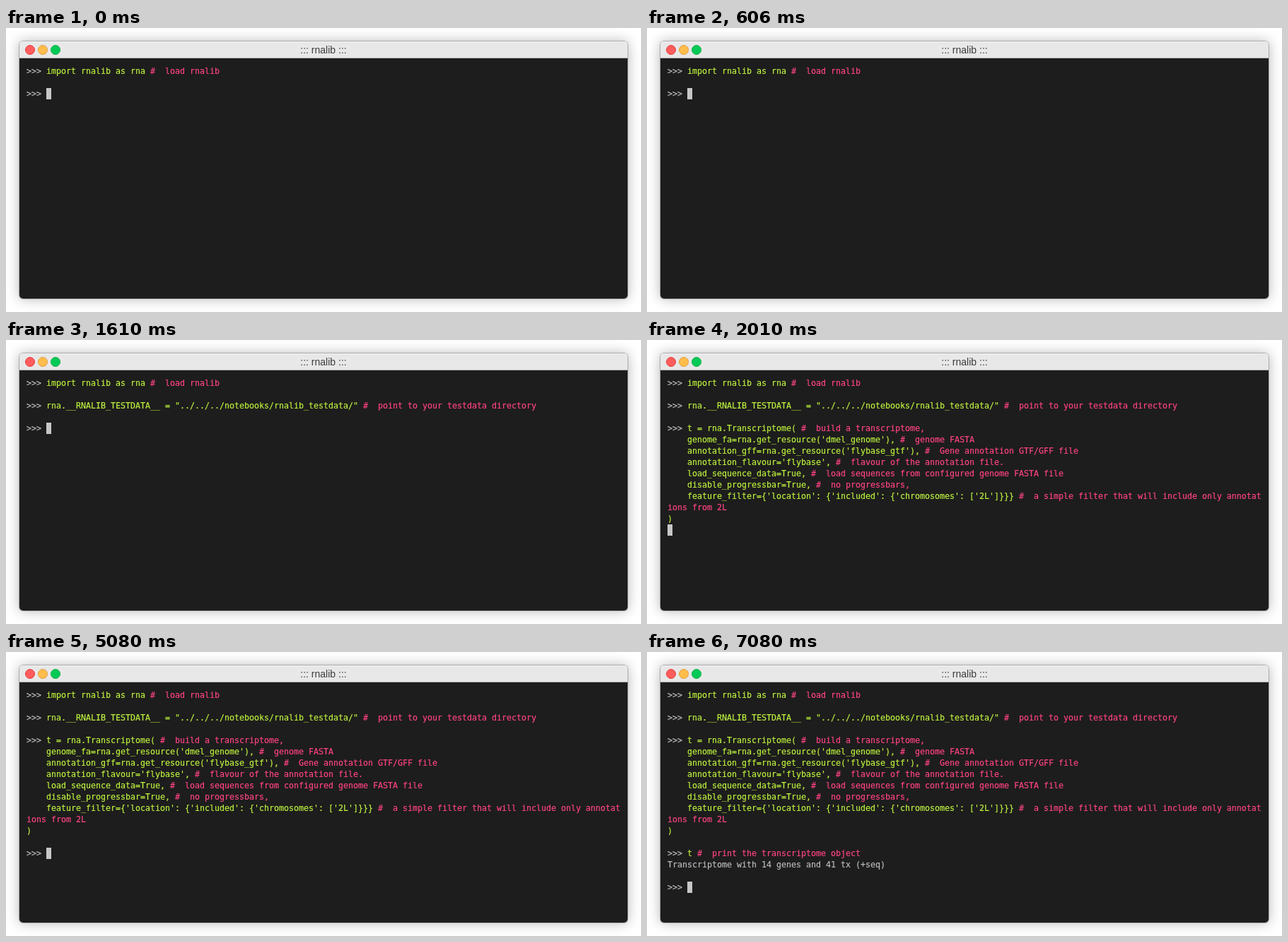
Recreate the animation shown at these times as an HTML page. Size 898x402 px, loop 8 s.

```html
<!DOCTYPE html>
<html lang="en">
<head>
<meta charset="utf-8">
<title>rnalib</title>
<style>
  html, body { margin: 0; width: 100%; height: 100%; overflow: hidden; background: #fff; }
  #window {
    position: absolute; left: 19px; top: 19px; width: 860px; height: 364px;
    border-radius: 5px; background: linear-gradient(#e8e8e8 20px, #1d1d1d 0);
    box-shadow: 0 0 0 1px #acacac, 0 0 18px rgba(0, 0, 0, .3);
  }
  #bar {
    height: 22px; border-top: 1px solid #f3f1f3; border-bottom: 1px solid #b1aeb1;
    border-radius: 5px 5px 0 0; background: #e8e8e8;
    font: 14px/22px "Liberation Sans", Arial, sans-serif; color: #3c3a3c; text-align: center;
  }
  #bar i {
    position: absolute; top: 5px; width: 12px; height: 12px;
    border: 1px solid; border-radius: 50%;
  }
  #screen {
    position: absolute; left: 10px; top: 34px; margin: 0;
    font: 11.64px/16px "DejaVu Sans Mono", monospace; color: #bababa;
    -webkit-text-stroke: .2px;
  }
  .code { color: #bdf03e; }
  .note { color: #fc4384; }
  #cursor { position: absolute; width: 7px; height: 16px; background: #c7c7c7; }
</style>
</head>
<body>
<div id="window">
  <div id="bar">
    <i style="left:8px;background:#ff5c5c;border-color:#e33e41"></i>
    <i style="left:26px;background:#ffbd4c;border-color:#e09e3e"></i>
    <i style="left:44px;background:#00ca56;border-color:#14ae46"></i>
    ::: rnalib :::
  </div>
  <pre id="screen"></pre>
  <div id="cursor"></div>
</div>
<script>
const LOOP = 8000, COLS = 120, CELL = 7, ROW = 16;
const screenEl = document.getElementById("screen");
const cursorEl = document.getElementById("cursor");

// Each step appends text to the terminal at a given time.
const steps = [
  [0, `>>> import rnalib as rna #  load rnalib

>>> `],
  [1010, `rna.__RNALIB_TESTDATA__ = "../../../notebooks/rnalib_testdata/" #  point to your testdata directory

>>> `],
  [2010, `t = rna.Transcriptome( #  build a transcriptome,
    genome_fa=rna.get_resource('dmel_genome'), #  genome FASTA
    annotation_gff=rna.get_resource('flybase_gtf'), #  Gene annotation GTF/GFF file
    annotation_flavour='flybase', #  flavour of the annotation file.
    load_sequence_data=True, #  load sequences from configured genome FASTA file
    disable_progressbar=True, #  no progressbars,
    feature_filter={'location': {'included': {'chromosomes': ['2L']}}} #  a simple filter that will include only annotations from 2L
)
`],
  [2080, `
>>> `],
  [7080, `t #  print the transcriptome object
Transcriptome with 14 genes and 41 tx (+seq)

>>> `]
];

const span = (name, text) => text ? `<span class="${name}">${text}</span>` : "";

function paintLine(line) {
  if (line.startsWith("Transcriptome")) return line;
  const [, prompt, code, note] = line.match(/^(>>> )?([^#]*)(.*)$/);
  const room = COLS - (prompt || "").length - code.length;
  const wrapped = note.length > room ? note.slice(0, room) + "\n" + note.slice(room) : note;
  return (prompt ? "&gt;&gt;&gt; " : "") + span("code", code) + span("note", wrapped);
}

function show(count) {
  const lines = steps.slice(0, count).map(step => step[1]).join("").split("\n");
  const html = lines.map(paintLine).join("\n");
  screenEl.innerHTML = html;
  const row = html.split("\n").length - 1;
  cursorEl.style.left = 10 + lines[lines.length - 1].length * CELL + "px";
  cursorEl.style.top = 34 + row * ROW + "px";
}

let shown = 0;
function frame() {
  const time = performance.now() % LOOP;
  const count = steps.filter(step => step[0] <= time).length;
  if (count !== shown) show(shown = count);
  requestAnimationFrame(frame);
}
frame();
</script>
</body>
</html>
```
